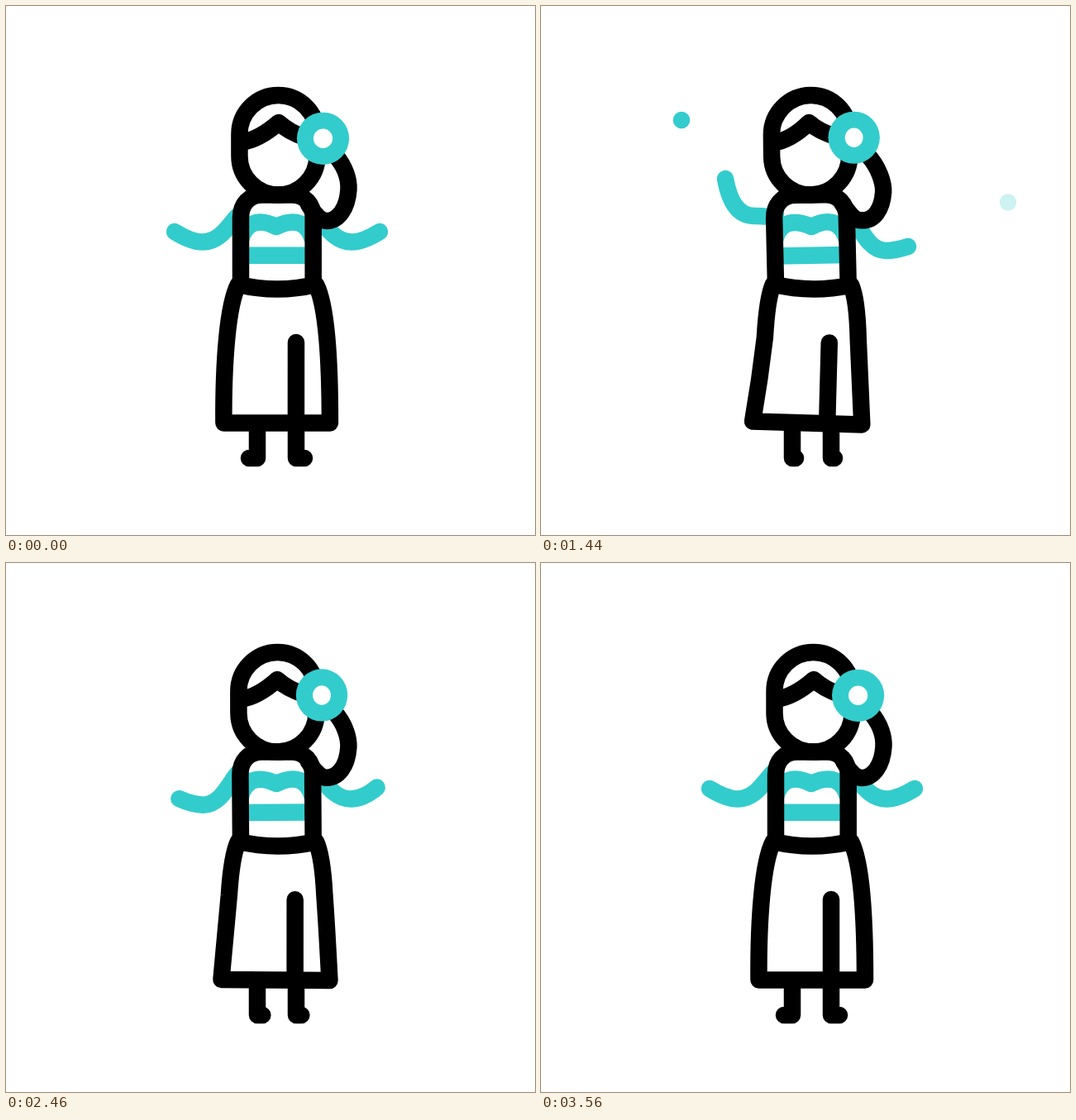
These frames come from a looping animation (640 by 640 pixels, 3600 ms). An HTML page with a canvas:

```html
<!DOCTYPE html>
<html>
<head>
<meta charset="utf-8">
<style>
  html, body { margin: 0; width: 100%; height: 100%; overflow: hidden; background: #fff; }
  canvas { display: block; width: 640px; height: 640px; }
</style>
</head>
<body>
<canvas id="stage" width="640" height="640"></canvas>
<script>
const ctx = document.getElementById('stage').getContext('2d');
const LOOP = 3600, REST = 3560, LINE = 20.5, BLACK = '#000', CYAN = '#33cccc';
const WAIST = 338, HEM = 505, CENTER = 328;

const clamp = (v) => Math.max(0, Math.min(1, v));
const smooth = (v) => clamp(v) ** 2 * (3 - 2 * clamp(v));
const easeOut = (v, power = 2) => 1 - (1 - clamp(v)) ** power;
const mix = (a, b, p) => a + (b - a) * p;
const mixAll = (a, b, p) => a.map((v, i) => mix(v, b[i], p));
const wave = (t, start, half) => Math.sin(Math.PI * (t - start) / half);
const bump = (t, peak, reach) => smooth(1 - Math.abs(t - peak) / reach);

// Lean swings between -1 (left) and 1 (right); energy grows from rest and fades back.
function poseAt(t) {
  const firstPeak = 598;
  const energy = easeOut(t / firstPeak, 3) * smooth((REST - t) / 1500) ** 2;
  return { energy, lean: energy * wave(Math.max(t, firstPeak), 860, 525) };
}

// The body bends about the waist; the skirt swings, narrows halfway and flares at the hem.
function bend(x, y, { lean, energy }) {
  const side = x - CENTER;
  if (y < WAIST - 12) {
    const shift = 11 * Math.sin(Math.PI / 2 * clamp((WAIST - y) / 200)) ** 1.3;
    return [x + lean * shift, y + lean * 0.055 * side];
  }
  const q = clamp((y - WAIST) / (HEM - WAIST));
  const spread = 0.03 * q ** 3 - 0.075 * Math.sin(Math.PI * q);
  return [x + lean * 17 * q ** 2.5 + energy * spread * side, y - lean * (0.03 + 0.06 * q) * side];
}

const bendPath = (path, pose) => path.replace(/(-?[\d.]+) (-?[\d.]+)/g,
  (_, x, y) => bend(+x, +y, pose).map((v) => v.toFixed(2)).join(' '));

function stroke(path, color = BLACK, cap = 'round') {
  ctx.strokeStyle = color;
  ctx.lineWidth = LINE;
  ctx.lineCap = cap;
  ctx.lineJoin = 'round';
  ctx.stroke(new Path2D(path));
}

function oval(x, y, rx, ry, color) {
  ctx.fillStyle = color;
  ctx.beginPath();
  ctx.ellipse(x, y, rx, ry, 0, 0, Math.PI * 2);
  ctx.fill();
}

function dot(x, y, from, to, t) {
  ctx.globalAlpha = clamp((t - from) / 80) * clamp((to - t) / 130);
  oval(x, y, 10.3, 10.3, CYAN);
  ctx.globalAlpha = 1;
}

function sparkle(x, y, age) {
  if (age <= 0 || age >= 320) return;
  const outer = 27 * easeOut(age / 200) + 0.01, inner = 27 * easeOut((age - 40) / 220);
  ctx.globalAlpha = clamp((320 - age) / 80);
  for (let i = 0; i < 4; i++) {
    const dx = Math.cos(i * Math.PI / 2), dy = Math.sin(i * Math.PI / 2);
    const at = (r) => `${(x + dx * r).toFixed(2)} ${(y + dy * r).toFixed(2)}`;
    stroke(`M${at(inner)}L${at(outer)}`, CYAN);
  }
  ctx.globalAlpha = 1;
}

// Hand x, y, bend x, y and forearm pull.
const ARM_REST = [204, 273, 238, 285.5, 224];
const ARM_LOW = [212, 291, 239, 296, 227];

function looseArm(high, lift, energy, mirrored) {
  const [hx, hy, bx, by, pull] = mixAll(mixAll(ARM_REST, ARM_LOW, energy), high, lift);
  ctx.save();
  if (mirrored) ctx.transform(-1, 0, 0, 1, 2 * CENTER, 0);
  stroke(`M284 251C273 258 ${bx + 24} ${by} ${bx} ${by}Q${pull} ${by} ${hx} ${hy}`, CYAN);
  ctx.restore();
}

function legs(t) {
  const step = -8 * wave(t, 880, 480), settle = smooth((REST - t) / 460);
  const left = mix(-10, step, smooth(t / 400) * settle);
  const right = mix(10, step, smooth((t - 400) / 400) * settle);
  stroke(`M304 507V547h${left}`);
  stroke(`M351 507V547h${right}`);
}

function raisedArm(u) {
  stroke(`M${398 + 14 * u} ${180 + 5 * u}C${412 + 8 * u} ${196 + 4 * u} ${415 + u} ${212 - 8 * u} ${414.5 + u} ${222 - 9 * u}
    C${413 + u} ${245 - 4 * u} ${402 - 3 * u} ${260 + u} ${388 - u} ${260 + 2 * u}C380 260 372 250 ${366 + 5 * u} ${240 + 4 * u}`);
}

function flower({ lean, energy }) {
  const x = 383.6 + 15 * lean, y = 160.3 + 3.2 * lean;
  oval(x, y, 31.6 - 0.8 * energy - 1.3 * lean, 31.6, CYAN);
  oval(x, y, 11.6 - 1.1 * energy - 1.2 * lean, 11.7, '#fff');
}

function draw(t) {
  const pose = poseAt(t), { lean, energy } = pose;
  const body = (path, color, cap) => stroke(bendPath(path, pose), color, cap);
  const dip = 327 - 6 * lean, parting = 330 + 6.5 * lean;

  ctx.fillStyle = '#fff';
  ctx.fillRect(0, 0, 640, 640);

  sparkle(103, 345, t - 427);
  sparkle(515.7, 100.3, t - 2000);
  dot(565, 237.5, 1040, 1473, t);
  dot(170, 138, 1290, 1820, t);
  dot(122.5, 113.5, 2600, 3080, t);
  dot(514.3, 369.5, 2480, 2960, t);

  looseArm([223, 209, 258, 254, 231], bump(t, 1440, 450), energy);
  looseArm([201, 232, 240, 264.5, 217], bump(t, 2160, 450), energy, true);
  body(`M284 283C290 262 305 256 ${dip} 267C350 256 365 262 371 283`, CYAN, 'butt');
  body('M286 301.7L370 301.7', CYAN, 'butt');

  legs(t);
  raisedArm(lean);
  // Torso
  body('M284 338C284 312 284 285 284 256C284 240 294 228.5 310 228.5L346 228.5'
    + 'C362 228.5 371.7 240 371.7 256C371.7 285 371.7 312 371.7 338');
  // Skirt and its slit
  body('M281 337C274.5 349.5 270 372.8 267.2 402.2C264.4 431.6 263.2 467.3 263.5 504.5L392 504.5'
    + 'C392 467.3 391 431.6 388.4 402.2C385.8 372.8 381.5 349.5 375 337Q328 348 281 337Z');
  body('M351 407C351 440 351 473 351 503');
  // Head and hair
  body('M282.5 155C282.5 129 303.5 108 329.5 108C355.5 108 376.5 129 376.5 155L376.5 181.5'
    + 'C376.5 207.5 355.5 228.5 329.5 228.5C303.5 228.5 282.5 207.5 282.5 181.5Z');
  body(`M284 165Q306 162 ${parting} 141Q${parting + 13} 153 362 159`);
  flower(pose);
}

function tick() {
  draw(performance.now() % LOOP);
  requestAnimationFrame(tick);
}
tick();
</script>
</body>
</html>
```
